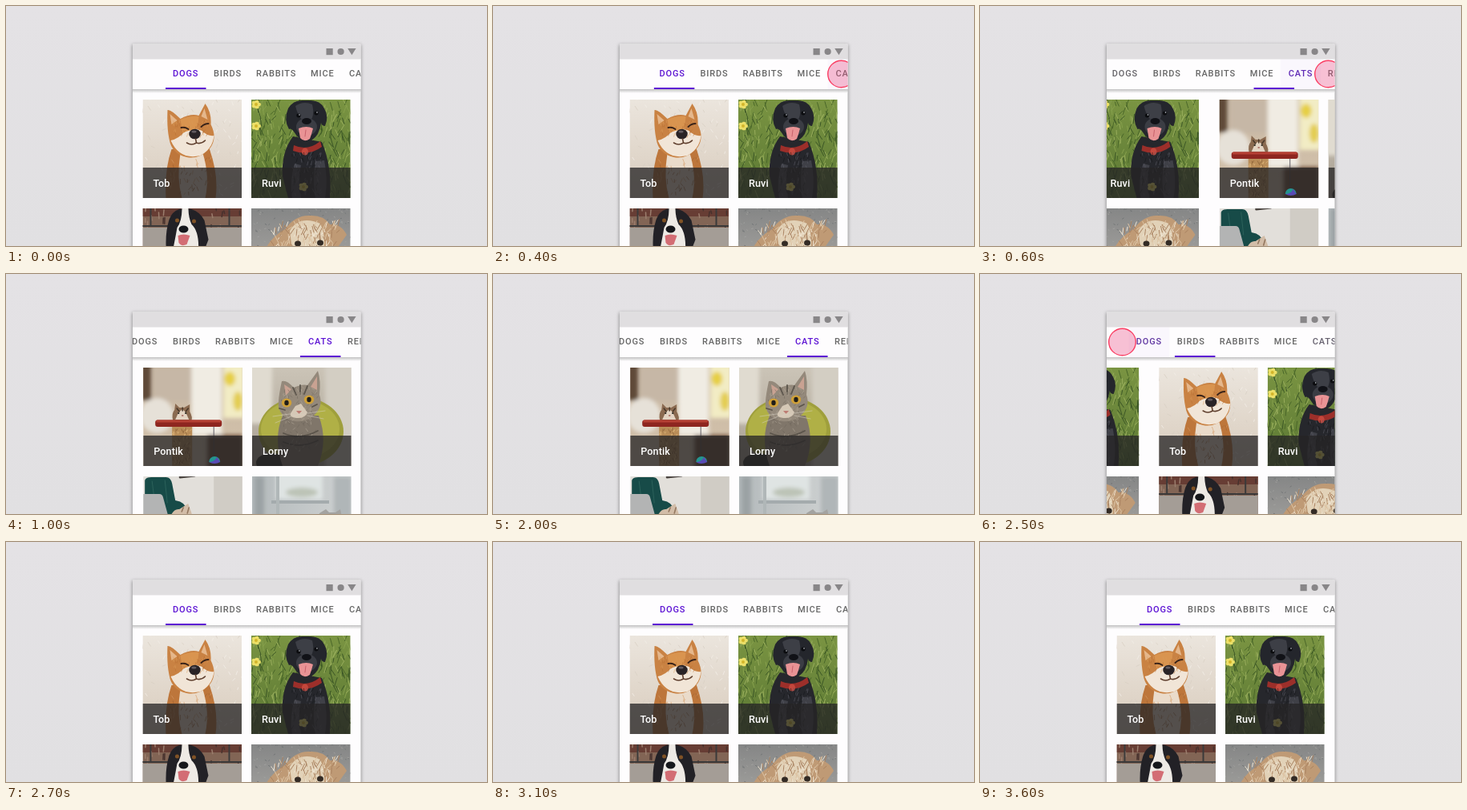
An HTML page for the animation above (3700 ms loop, 600 by 300 pixels).

```html
<!DOCTYPE html>
<html lang="en">
<head>
<meta charset="utf-8">
<title>Scrollable tabs</title>
<style>
  html, body { margin: 0; width: 100%; height: 100%; overflow: hidden; background: #e3e1e4; }
  svg { display: block; }
  text { font-family: Roboto, Arial, sans-serif; font-weight: 500; }
  .tab { font-size: 11px; letter-spacing: .85px; }
  .name { font-size: 12.6px; letter-spacing: .12px; fill: #fff; }
</style>
</head>
<body>
<svg id="stage" width="600" height="300" viewBox="0 0 600 300"></svg>
<script>
const LOOP = 3700, STEP = 100, PAGE = 284, SCROLL = 51;
const TAB_MS = 400, PAGE_DELAY = 129, PAGE_MS = 264;
const GO = 373, BACK = 2311;
const TABS = [['DOGS', 208], ['BIRDS', 259], ['RABBITS', 312], ['MICE', 380], ['CATS', 428], ['REPTILES', 477]];
const GREY = [102, 102, 102], PURPLE = [92, 18, 212];

let seed = 7;
const rnd = () => (seed = seed * 16807 % 2147483647) / 2147483647;
const between = (a, b) => a + rnd() * (b - a);

const path = (d, fill, more = '') => `<path d="${d}" fill="${fill}" ${more}/>`;
const line = (d, color, w = 1) => path(d, 'none', `stroke="${color}" stroke-width="${w}" stroke-linecap="round"`);
const oval = (x, y, rx, ry, fill, more = '') => `<ellipse cx="${x}" cy="${y}" rx="${rx}" ry="${ry}" fill="${fill}" ${more}/>`;
const rect = (x, y, w, h, fill, more = '') => `<rect x="${x}" y="${y}" width="${w}" height="${h}" fill="${fill}" ${more}/>`;
const soft = 'filter="url(#soft)"';

// Short random strokes for fur, grass and rug texture.
function strokes(n, [x, y, w, h], len, lean, colors, width = .8) {
  const d = colors.map(() => '');
  for (let i = 0; i < n; i++) {
    d[i % colors.length] += `M${between(x, x + w).toFixed(1)} ${between(y, y + h).toFixed(1)}l${between(-lean, lean).toFixed(1)} ${between(-len, -len / 3).toFixed(1)}`;
  }
  return d.map((p, i) => line(p, colors[i], width)).join('');
}

const flower = (x, y) => [0, 1, 2, 3, 4].map(i =>
  oval((x + 3.2 * Math.cos(i * 1.257)).toFixed(1), (y + 3.2 * Math.sin(i * 1.257)).toFixed(1), 2.7, 2.3, '#ecdf68')).join('') + oval(x, y, 2, 2, '#d2b52b');

const shiba = () =>
  rect(0, 0, 124, 123, 'url(#rug)') + strokes(90, [0, 0, 124, 123], 5, 4, ['#f3eee7', '#d9d0c5']) +
  path('M36 62Q27 88 29 123H91Q95 94 83 61Z', '#bd763b') +
  path('M47 67Q42 98 49 123H78Q84 96 75 67Z', '#eadbca') +
  path('M31 13Q35 12 47 24Q60 17 70 20L78 5Q86 16 85 31Q94 49 83 62Q70 75 55 72Q36 68 33 49Q30 35 31 13Z', '#c98243') +
  path('M34 18L43 26L36 31ZM77 11L81 25L73 21Z', '#e5b78b') +
  path('M35 51Q45 49 52 40Q62 33 74 39Q81 46 89 45Q87 62 72 70Q46 76 35 51Z', '#f1e5d7') +
  path('M47 25Q58 20 70 21Q69 34 66 38Q56 38 50 42Z', '#d9944f') +
  strokes(60, [37, 28, 45, 20], 4, 2, ['#d99a59', '#b66f32'], .5) +
  strokes(45, [32, 75, 55, 45], 6, 3, ['#d59b67', '#9e602f'], .6) +
  line('M48 35Q53 34 57 37M73 34Q77 30 82 30', '#3b2419', 2) +
  oval(65, 43, 7.2, 6.3, '#292326') + oval(64, 40, 3, 1.5, '#625b60') +
  line('M66 49L67 54Q61 58 55 54M67 54Q73 56 78 51', '#60402f', 1.6);

const blackDog = () =>
  rect(0, 0, 124, 123, 'url(#grass)') +
  strokes(420, [-2, 4, 128, 125], 12, 5, ['#86a04c', '#4a6729', '#98ad5c', '#3c5726'], 1) +
  flower(6, 6) + flower(6, 33) +
  path('M52 46Q37 66 39 96L46 123H98Q101 84 88 53Z', '#26272c') +
  path('M54 80Q47 103 51 123H62Q58 98 62 82M80 77Q76 103 80 123H92Q96 100 91 76Z', '#3f4047') +
  path('M46 11Q52 1 63 1H74Q86 1 91 11Q97 21 92 33Q88 33 87 29Q85 45 75 51Q60 53 53 40Q50 35 47 37Q40 25 46 11Z', '#24262c') +
  path('M55 8Q65 1 76 6Q80 23 71 28Q60 28 55 8Z', '#3d3f46') +
  oval(69, 34, 13, 11, '#3b3d44') + oval(69, 27, 6, 4, '#111217') +
  oval(59, 20, 2.7, 2.4, '#0c0d10') + oval(81, 17, 2.7, 2.4, '#0c0d10') +
  oval(60, 19, .8, .8, '#d4d9df') + oval(82, 16, .8, .8, '#d4d9df') +
  path('M59 36Q69 32 77 36Q75 44 73 49Q66 54 61 48Z', '#e99395') + line('M68 38L67 46', '#c7616b') +
  path('M53 57Q70 65 86 52L88 59Q72 71 52 64Z', '#9c2f2a') + oval(67, 65, 4, 4.5, '#c4473c') +
  strokes(90, [50, 69, 38, 51], 5, 2, ['#5b5c65', '#17181c'], .6) + flower(65, 109);

const collie = () =>
  rect(0, 0, 124, 60, '#826555') + rect(0, 0, 124, 10, '#673d34') +
  strokes(24, [0, 2, 124, 27], 8, 1, ['#46312d', '#9b7d6d'], 1.5) + rect(0, 24, 124, 30, '#a49d96') +
  line('M0 22H124M10 0V22M108 0V22', '#3b3a3a', 2) +
  path('M30 60Q27 33 33 14Q38 0 53 0Q69 0 77 15L82 39L74 60Z', '#222126') +
  path('M49 0H57Q57 11 61 20Q72 30 69 60H36Q40 41 43 24Q49 16 49 0Z', '#eeeae5') +
  oval(43, 15, 2.5, 2.5, '#805225') + oval(64, 16, 2.5, 2.5, '#805225') +
  oval(51, 26, 6, 4.5, '#16171b') + path('M44 34Q51 31 59 34L55 45Q48 48 45 43Z', '#d36d74');

const shaggy = () =>
  rect(0, 0, 124, 60, 'url(#road)') + strokes(100, [0, 0, 124, 48], 1, 2, ['#6d7071', '#a5a5a2']) +
  path('M18 50Q25 36 42 26Q55 8 73 9Q90 8 98 20Q112 19 119 33L109 47V60H22Z', '#bf9a75') +
  path('M48 28Q60 8 86 19Q95 38 88 60H52Z', '#e2d2b8') +
  strokes(150, [28, 20, 82, 40], 9, 5, ['#efe4d2', '#a98260', '#dcc3a3'], 1) +
  oval(58, 44, 4, 3.5, '#332b25') + oval(86, 43, 4, 3.5, '#332b25');

const shelfCat = () =>
  rect(0, 0, 124, 123, 'url(#room)') +
  `<g ${soft}>${rect(-5, -5, 15, 46, '#5f4939')}${rect(13, 0, 48, 42, '#c6b7a6')}${rect(60, -5, 38, 90, '#f0ece3')}${rect(100, -5, 28, 68, '#f2ecc4')}${oval(108, 14, 7, 9, '#e6cf45')}${oval(118, 42, 6, 12, '#e3cd52')}${rect(80, 84, 44, 44, '#6d4f3a')}${oval(17, 60, 21, 22, '#e6e1d8')}</g>` +
  rect(36, 72, 25, 51, '#b98d58') + strokes(90, [37, 78, 22, 45], 4, 2, ['#dfb77a', '#8c6238']) +
  path('M37 66Q35 57 39 53L40 45L45 50H51L58 46L58 55Q62 62 60 67Z', '#8a6a50') +
  path('M44 56L49 52L53 56L57 65H40Z', '#e3d4c3') + line('M42 51L45 55M49 50V54M56 51L53 55', '#493728', 1.5) +
  oval(44, 57, 1.2, 1.1, '#2b2820') + oval(53, 57, 1.2, 1.1, '#2b2820') + oval(49, 60, 1.4, 1, '#ae756d') +
  rect(15, 65.5, 83, 8.5, '#8e2620', 'rx="3"') + rect(16, 65.5, 81, 3, '#b53f33', 'rx="1.5"') +
  line('M88 74V113', '#54515a', .9);

const ball = path('M82 118A7 7 0 0 1 96 118Z', '#24958f') + path('M82 118Q89 122 96 118L92 112Q89 118 82 118Z', '#584bb5');

const tabby = () =>
  rect(0, 0, 124, 123, 'url(#wall)') + `<g ${soft}>${rect(-5, -5, 30, 75, '#e0dbd0')}${rect(91, -5, 38, 133, '#d3cec3')}</g>` +
  oval(61, 80, 53, 43, '#9f9f3c') + oval(60, 77, 49, 37, '#b0b046') + oval(24, 119, 19, 12, '#2c2a25') +
  path('M38 60Q26 89 38 123H82Q95 91 83 60Z', '#80766a') +
  path('M37 17Q43 15 52 25Q63 20 69 22L82 4Q86 16 84 34Q89 48 78 59Q67 69 53 67Q36 63 33 49Q32 40 37 17Z', '#94897b') +
  path('M40 21L49 27L42 35ZM81 11L81 28L73 24Z', '#c9a292') +
  line('M51 25L55 34M60 22V33M69 23L65 33M34 51L41 53M81 46L75 49M39 82Q60 91 82 79M39 93Q60 102 82 91', '#5b544b', 1.8) +
  strokes(130, [36, 26, 45, 80], 4, 3, ['#b7ac9c', '#6d655a'], .5) +
  path('M54 48L61 45L69 56Q66 64 55 63Q46 62 48 57Z', '#d5c8b6') +
  oval(43, 44, 6.2, 5.6, '#cfa038') + oval(71, 40, 6.2, 5.6, '#cfa038') + oval(43, 44, 2.7, 3.2, '#201e19') + oval(71, 40, 2.7, 3.2, '#201e19') +
  path('M55 54H62L58.5 58Z', '#bd7d73') + line('M58 58Q54 62 50 59M58 58Q63 61 66 57M47 58L26 61M49 61L29 69M69 57L91 54M69 60L89 64', '#d9d2c7', .5);

const chairCat = () =>
  rect(0, 0, 124, 60, '#e2dfda') + rect(88, 0, 36, 60, '#d0ccc5') + line('M46 1L64 -1', '#4a4440', 3) +
  path('M2 5Q3 1 10 1H27Q34 0 36 9L40 30Q53 32 55 43L46 60H2Z', '#174b48') + line('M11 6L15 38M27 5L30 33', '#2b615a') +
  path('M0 22H20Q24 22 25 27L31 49H0Z', '#b3b4b4') +
  path('M34 50Q38 40 45 41L56 34L60 45L64 60H30Z', '#d2bda8') + line('M50 39L48 44M57 39L55 46', '#93775f', 1.6);

const curtainCat = () =>
  rect(0, 0, 124, 60, 'url(#curtain)') +
  `<g ${soft}>${rect(30, -5, 58, 34, '#dfe4e3')}${oval(62, 20, 20, 6, '#bcc3b6')}${rect(3, 0, 12, 60, '#9ba2a4')}${rect(102, 0, 22, 60, '#b0b6b8')}</g>` +
  rect(24, 30, 72, 4, '#a4abad') + rect(30, 0, 4, 60, '#b0b7b8') + path('M80 60L84 46L92 41L96 45H104L110 41L114 60Z', '#a3a3a1');

function tile(x, y, art, name, over = '') {
  const label = name ? rect(0, 85, 124, 38, '#262425', 'opacity=".76"') + `<text class="name" x="13" y="109">${name}</text>` : '';
  return `<svg x="${x}" y="${y}" width="123.5" height="123" overflow="hidden">${art()}${label}${over}</svg>`;
}

const gradient = (id, a, b, dir = 'x2="0" y2="1"') =>
  `<linearGradient id="${id}" ${dir}><stop stop-color="${a}"/><stop offset="1" stop-color="${b}"/></linearGradient>`;

const stage = document.getElementById('stage');
stage.innerHTML = `
<defs>
  ${gradient('back', '#e4e2e5', '#e1e0e2')}${gradient('rug', '#ebe5dd', '#d8cbbc')}${gradient('grass', '#7a9442', '#5a7733')}
  ${gradient('road', '#858686', '#a09f9c')}${gradient('room', '#c9b8a4', '#d3c2ab')}
  ${gradient('wall', '#cbc4b7', '#a89f92')}${gradient('curtain', '#b4babc', '#cfd2d2', 'x2="1" y2="0"')}
  ${gradient('barShade', '#777', '#fff')}
  <filter id="soft"><feGaussianBlur stdDeviation="2.5"/></filter>
  <filter id="shadow" x="-10%" y="-10%" width="120%" height="120%"><feGaussianBlur stdDeviation="2.2"/></filter>
  <clipPath id="window"><rect x="158" y="47.4" width="284.5" height="260" rx="1"/></clipPath>
  <g id="dogs">${tile(170.5, 117, shiba, 'Tob')}${tile(306, 117, blackDog, 'Ruvi')}${tile(170.5, 253, collie)}${tile(306, 253, shaggy)}</g>
  <g id="cats">${tile(171.2, 117, shelfCat, 'Pontik', ball)}${tile(307, 117, tabby, 'Lorny')}${tile(171.2, 253, chairCat)}${tile(307, 253, curtainCat)}</g>
</defs>
${rect(0, 0, 600, 300, 'url(#back)')}
${rect(157.5, 48.4, 285.5, 270, '#555', 'opacity=".6" filter="url(#shadow)"')}
<g clip-path="url(#window)">
  ${rect(157, 47, 286, 260, '#fefdfe')}
  <use id="left" href="#dogs"/><use id="right" href="#cats"/>
  ${rect(157, 104, 286, 5, 'url(#barShade)', 'opacity=".45"')}
  ${rect(157, 66, 286, 38, '#fefdfe')}
  <g id="bar">
    ${rect(0, 66, 50.5, 38, '#5a14c8', 'id="ripple"')}
    ${TABS.map(([label, x]) => `<text class="tab" x="${x}" y="88.4">${label}</text>`).join('')}
    ${rect(0, 102, 50.5, 2, '#5c12d4', 'id="marker"')}
  </g>
  ${rect(157, 47, 286, 19.5, '#e0dee0')}
  ${rect(399.5, 53, 8.2, 8.2, '#888688')}${oval(417.6, 57, 4.1, 4.1, '#888688')}${path('M426.2 53H436.6L431.4 61.2Z', '#888688')}
  <circle id="touch" cy="85" fill="#e64b82" fill-opacity=".34" stroke="#fa3d62" stroke-width="1.4"/>
</g>`;

const [left, right, bar, ripple, marker, touch] =
  ['left', 'right', 'bar', 'ripple', 'marker', 'touch'].map(id => document.getElementById(id));
const tabs = [...document.querySelectorAll('.tab')];
const clamp = v => Math.min(1, Math.max(0, v));
const tint = p => `rgb(${GREY.map((g, i) => Math.round(g + (PURPLE[i] - g) * p))})`;

// Standard curve: cubic-bezier(.4, 0, .2, 1)
function ease(v) {
  const x = clamp(v);
  let lo = 0, hi = 1;
  for (let i = 0; i < 24; i++) {
    const s = (lo + hi) / 2, r = 1 - s;
    if (1.2 * r * r * s + .6 * r * s * s + s * s * s < x) lo = s; else hi = s;
  }
  return lo * lo * (3 - 2 * lo);
}

function draw(t) {
  const travel = (delay, ms) => ease((t - GO - delay) / ms) - ease((t - BACK - delay) / ms);
  const tabPos = travel(0, TAB_MS), pagePos = travel(PAGE_DELAY, PAGE_MS);

  bar.setAttribute('transform', `translate(${-SCROLL * tabPos})`);
  marker.setAttribute('x', 199 + 219 * tabPos);
  tabs.forEach(tab => tab.setAttribute('fill', tint(0)));
  tabs[0].setAttribute('fill', tint((1 - tabPos) ** 2));
  tabs[4].setAttribute('fill', tint(tabPos ** 2));

  left.setAttribute('x', -PAGE * pagePos);
  right.setAttribute('x', PAGE * (1 - pagePos));
  // The open page takes on the new content as soon as the return begins.
  right.setAttribute('href', t >= BACK ? '#dogs' : '#cats');

  const forward = t < 1500, since = t - (forward ? GO : BACK);
  const grown = clamp((since + 120) / 120);
  const shown = grown * (1 - clamp((since - 230) / 130));
  touch.setAttribute('cx', forward ? 434.5 : 177.5);
  touch.setAttribute('r', 12 + 4.8 * grown);
  touch.setAttribute('opacity', shown);
  ripple.setAttribute('x', forward ? 418 : 199);
  ripple.setAttribute('opacity', since >= 0 ? .025 * shown : 0);
}

const start = performance.now();
function tick(now) {
  const t = Math.max(0, now - start) % LOOP;
  draw(Math.floor(t / STEP) * STEP);
  requestAnimationFrame(tick);
}
draw(0);
requestAnimationFrame(tick);
</script>
</body>
</html>
```
